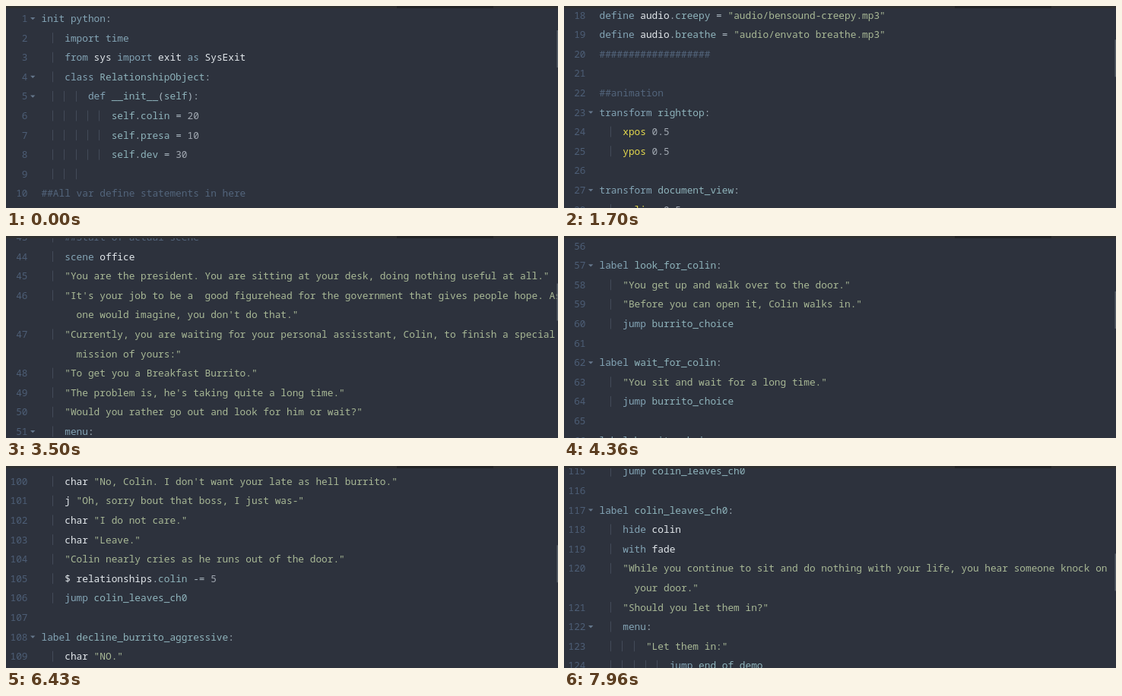
Write an HTML page with a canvas that moves like this. It is 726 px wide and 266 px high and loops after 8 s.

```html
<!DOCTYPE html>
<html lang="en">
<head>
<meta charset="utf-8">
<title>Script scroll</title>
<style>
html, body { margin: 0; width: 100%; height: 100%; overflow: hidden; background: #2d323d; }
canvas { display: block; }
</style>
</head>
<body>
<canvas id="stage" width="726" height="266"></canvas>
<script>
// A leading "~" marks the wrapped remainder of the string above it.
const script = `init python:
    import time
    from sys import exit as SysExit
    class RelationshipObject:
        def __init__(self):
            self.colin = 20
            self.presa = 10
            self.dev = 30
${" ".repeat(8)}
##All var define statements in here
define j = Character("Colin")
define p = Character("Presa")
define d = Character("Dev")
define char = Character("You")
define relationships = RelationshipObject()
##audio
define audio.office = "audio/office.mp3"
define audio.creepy = "audio/bensound-creepy.mp3"
define audio.breathe = "audio/envato breathe.mp3"
###################

##animation
transform righttop:
    xpos 0.5
    ypos 0.5

transform document_view:
    xalign 0.5
    yalign 0.5

transform midright:
    yalign 1.0
    xcenter 0.75

transform midleft:
    yalign 1.0
    xcenter 0.25

label start:
    ##default scene 00
    scene black
    with fade
    ##Start of actual scene
    scene office
    "You are the president. You are sitting at your desk, doing nothing useful at all."
    "It's your job to be a  good figurehead for the government that gives people hope. As
~one would imagine, you don't do that."
    "Currently, you are waiting for your personal assisstant, Colin, to finish a special
~mission of yours:"
    "To get you a Breakfast Burrito."
    "The problem is, he's taking quite a long time."
    "Would you rather go out and look for him or wait?"
    menu:
        "Look for him":
            jump look_for_colin
        "Wait":
            jump wait_for_colin

label look_for_colin:
    "You get up and walk over to the door."
    "Before you can open it, Colin walks in."
    jump burrito_choice

label wait_for_colin:
    "You sit and wait for a long time."
    jump burrito_choice

label burrito_choice:
    j "Here is your burrito, boss."
    menu:
        "Accept":
            jump accept_burrito
        "Decline Politely":
            jump decline_burrito_polite
        "Decline Rudely":
            jump decline_burrito_rude
        "Decline Aggressively":
            jump decline_burrito_aggressive

label accept_burrito:
    char "Thank you, Colin, but what took so long?"
    j "Sorry, boss, but I was busy, as my daughter-"
    char "Oh, nevermind. I don't care."
    j "Oh, sure, enough boss"
    char "You can go now."
    "Colin walks out of the door."
    $ relationships.colin += 5
    jump colin_leaves_ch0

label decline_burrito_polite:
    char "No thank you, Colin."
    char "I am not hungry anymore."
    j "Oh, okay boss."
    char "Maybe some other time."
    j "I will be outside."
    "Colin looks a little sad."
    "He closes the door behind him."
    $ relationships.colin -= 1
    jump colin_leaves_ch0

label decline_burrito_rude:
    char "No, Colin. I don't want your late as hell burrito."
    j "Oh, sorry bout that boss, I just was-"
    char "I do not care."
    char "Leave."
    "Colin nearly cries as he runs out of the door."
    $ relationships.colin -= 5
    jump colin_leaves_ch0

label decline_burrito_aggressive:
    char "NO."
    j "But boss, I-"
    char "GET OUT."
    "You throw the burrito at the wall."
    "Colin runs out of the door."
    $ relationships.colin -= 10
    jump colin_leaves_ch0

label colin_leaves_ch0:
    hide colin
    with fade
    "While you continue to sit and do nothing with your life, you hear someone knock on
~your door."
    "Should you let them in?"
    menu:
        "Let them in:"
            jump end_of_demo
        "Ignore them:"
            jump end_of_demo`;

const W = 726, H = 266, LOOP = 8000, STEP = 200 / 3;
const CHAR = 7.68, ROW = 25.6, LEFT = 46.5, FIRST = 16.5, CURSOR_LINE = 38;
const color = {
  bg: "#2d323d", active: "#3d4556", caret: "#c3c8d0", gutter: "#4d5e76", fold: "#64768b",
  guide: "#434b59", comment: "#53657c", string: "#a9b996", number: "#a2a9b2",
  keyword: "#84a5b6", name: "#8fb4bc", plain: "#e3e8ec", prop: "#e5d94e", punct: "#a9b7c0"
};
const words = list => new Set(list.split(" "));
const keywords = words("init python import time from as class def define transform label jump menu scene hide with");
const plain = words("sys exit SysExit audio office black char j relationships colin fade");
const props = words("xpos ypos xalign yalign xcenter ycenter");

function tokenColor(token, afterDot) {
  if (token.startsWith("##")) return color.comment;
  if (token[0] === '"') return color.string;
  if (/^\d/.test(token)) return color.number;
  if (token === "$") return color.plain;
  if (!/^\w/.test(token)) return color.punct;
  if (afterDot) return color.name;
  if (keywords.has(token)) return color.keyword;
  if (plain.has(token)) return color.plain;
  return props.has(token) ? color.prop : color.name;
}

function tokenize(text) {
  const tokens = [];
  let last = "";
  for (const m of text.matchAll(/##.*|"[^"]*"?|\d[\d.]*|\w+|[^\w\s"]+/g)) {
    tokens.push({ text: m[0], col: m.index, fill: tokenColor(m[0], last === ".") });
    last = m[0];
  }
  return tokens;
}

let count = 0;
const rows = script.split("\n").map(text => {
  if (text[0] === "~") {
    return { indent: 0, tokens: [{ text: text.slice(1), col: 6, fill: color.string }] };
  }
  return { number: ++count, indent: text.search(/\S|$/), fold: text.endsWith(":"), tokens: tokenize(text) };
});

// Scroll offset keys: time in ms, offset in px, speed in px per ms.
const keys = [
  [0, 0, 0.17], [1700, 439.7, 0.29], [2630, 744.4, 0.36], [3500, 1090.3, 0.42],
  [5230, 1872.3, 0.51], [6430, 2580.6, 0.37], [7960, 2979.3, 0.19]
];

function scrollAt(t) {
  let i = 0;
  while (i < keys.length - 2 && t >= keys[i + 1][0]) i++;
  const [t0, y0, v0] = keys[i], [t1, y1, v1] = keys[i + 1];
  const d = t1 - t0, u = Math.min(1, (t - t0) / d), u2 = u * u, u3 = u2 * u;
  return y0 * (2 * u3 - 3 * u2 + 1) + y1 * (3 * u2 - 2 * u3)
    + d * (v0 * (u3 - 2 * u2 + u) + v1 * (u3 - u2));
}

// The picture advances at 15 steps per second after a short hold.
function stepTime(t) {
  return t < 100 ? 0 : 100 + Math.floor((t - 93.3) / STEP) * STEP;
}

const ctx = document.getElementById("stage").getContext("2d");

function box(fill, x, y, w, h) {
  ctx.fillStyle = fill;
  ctx.fillRect(x, y, w, h);
}

function label(text, x, y, fill) {
  ctx.fillStyle = fill;
  ctx.fillText(text, x, y);
}

function drawRow(row, y) {
  if (row.number === CURSOR_LINE) {
    box(color.active, 0, y - ROW / 2, W, ROW);
    box(color.caret, 46, y - ROW / 2, 2, ROW);
  }
  const base = y + 4.5;
  if (row.number) {
    const digits = String(row.number);
    label(digits, 28.5 - digits.length * CHAR, base, color.gutter);
  }
  if (row.fold) {
    ctx.fillStyle = color.fold;
    ctx.beginPath();
    ctx.moveTo(32, y - 1.5);
    ctx.lineTo(38.4, y - 1.5);
    ctx.lineTo(35.2, y + 1.8);
    ctx.fill();
  }
  for (let c = 2; c < row.indent; c += 2) {
    box(color.guide, Math.round(LEFT + c * CHAR) - 1, y - 7, 1, 14);
  }
  for (const t of row.tokens) label(t.text, LEFT + t.col * CHAR, base, t.fill);
}

function draw(t) {
  const offset = scrollAt(stepTime(t));
  box(color.bg, 0, 0, W, H);
  ctx.font = '12.8px "Noto Sans Mono", "DejaVu Sans Mono", monospace';
  rows.forEach((row, i) => {
    const y = FIRST + i * ROW - offset;
    if (y > -ROW && y < H + ROW) drawRow(row, y);
  });
  box("#596069", 724.5, 32 + offset * 0.028, 1.5, 49);
  box("#2f3031", 0, 0, W, 3);
  box("#232426", 514, 0, 127, 3);
}

const start = performance.now();
function tick() {
  draw((performance.now() - start) % LOOP);
  requestAnimationFrame(tick);
}
tick();
</script>
</body>
</html>
```
